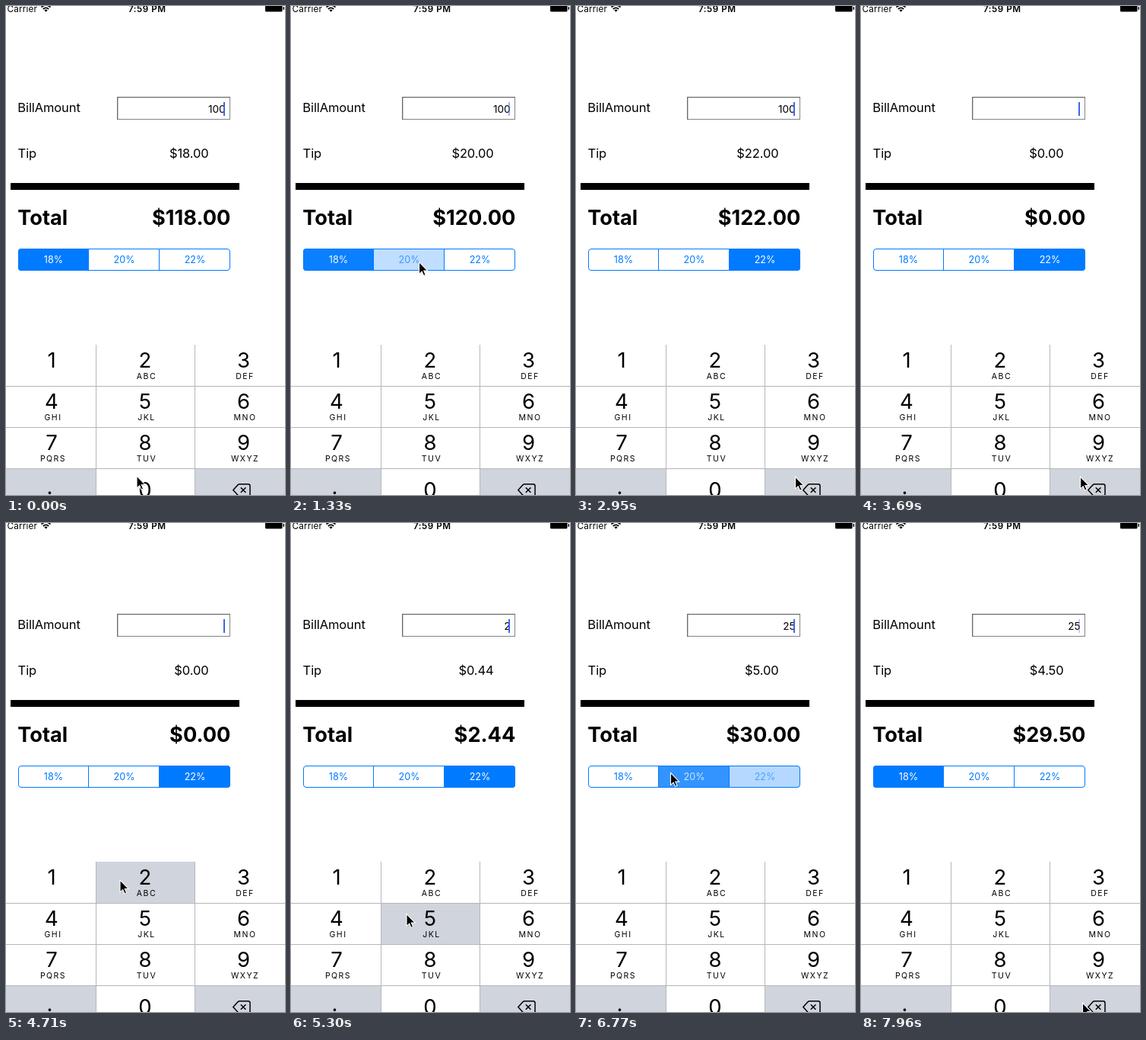
Animation of 367 by 641 pixels, one loop 8000 ms. Source, as an HTML page:

```html
<!DOCTYPE html>
<html lang="en">
<head>
<meta charset="utf-8">
<title>Tip calculator</title>
<style>
  html, body { margin: 0; width: 100%; height: 100%; overflow: hidden; background: #fff; }
  svg { display: block; width: 100%; height: 100%; font-family: Inter, Roboto, "Liberation Sans", sans-serif; }
  .label { font-size: 16.5px; letter-spacing: -0.1px; }
  .total { font-size: 27.2px; font-weight: 700; }
  .field { font-size: 13.6px; }
  .seg { font-size: 12.6px; text-anchor: middle; }
  .digit { font-size: 27.5px; text-anchor: middle; }
  .letters { font-size: 10.5px; letter-spacing: 1.5px; text-anchor: middle; }
  .status { font-size: 11.7px; letter-spacing: 0.2px; }
  .clock { font-weight: 600; letter-spacing: 0.5px; }
  .end { text-anchor: end; }
</style>
</head>
<body>
<svg viewBox="0 0 367 641">
  <defs>
    <clipPath id="round"><rect x="16" y="318" width="279" height="29" rx="4"/></clipPath>
  </defs>

  <text class="status" x="1.5" y="7.6">Carrier</text>
  <g fill="none" stroke="#000" stroke-width="1.7">
    <path d="M46.5 1.6 Q52.5 -3.6 58.5 1.6"/>
    <path d="M48.8 4 Q52.5 0.9 56.2 4"/>
  </g>
  <path d="M50.4 5.4 Q52.5 3.8 54.6 5.4 L52.5 7.7 Z"/>
  <text class="status clock" x="161" y="7.6">7:59 PM</text>
  <rect x="341" y="-2" width="22.5" height="9.5" rx="1.5"/>
  <rect x="364.5" y="1" width="1.5" height="4" rx="0.7"/>

  <text class="label" x="15.3" y="138.6">BillAmount</text>
  <rect x="146.5" y="119.5" width="148" height="29" fill="#fff" stroke="#858585"/>
  <path d="M146 119.75 H295 M146.75 119 V149" stroke="#666" stroke-width="1.2"/>
  <text class="field end" id="amount" x="288.6" y="140.4"></text>
  <rect id="caret" x="286" y="126" width="2" height="18" fill="#3f66ea"/>

  <text class="label" x="15.6" y="198.8">Tip</text>
  <text class="label end" id="tip" x="266.6" y="198.8"></text>
  <rect x="6" y="232" width="301" height="9"/>
  <text class="total" x="15.3" y="286.8">Total</text>
  <text class="total end" id="total" x="295.4" y="287.2"></text>

  <g id="segments" clip-path="url(#round)"></g>
  <g fill="none" stroke="#007aff">
    <rect x="16.5" y="318.5" width="278" height="28" rx="3.5"/>
    <path d="M108.5 318 V347 M201.5 318 V347"/>
  </g>

  <g id="keys"></g>
  <path d="M0 498.5 H367 M0 552.5 H367 M0 606.5 H367 M118.5 444 V641 M248.5 444 V641" stroke="#b5b6ba"/>
  <g fill="none" stroke="#000" stroke-width="1.5" stroke-linejoin="round">
    <path d="M298.8 634.5 L305.2 627.6 Q306 626.8 307.2 626.8 H318.6 Q321 626.8 321 629.2 V639.8 Q321 642.2 318.6 642.2 H307.2 Q306 642.2 305.2 641.4 Z"/>
    <path d="M308.8 631.2 L315.4 637.8 M315.4 631.2 L308.8 637.8"/>
  </g>

  <g id="pointer">
    <path d="M0.8 1.2 V17.2 L4.5 13.8 L6.8 19 L9.4 18 L7.1 12.7 H12 Z" opacity="0.18"/>
    <path d="M0 0 V16 L3.7 12.6 L6 18 L8.6 17 L6.3 11.6 H11.3 Z" stroke="#fff" stroke-width="1.1"/>
  </g>
</svg>

<script>
const LOOP = 8000, STEP = 147.4, LEAD = 12;
const GREY = "#d0d4dc";
const $ = id => document.getElementById(id);
const clamp = v => Math.max(0, Math.min(1, v));

function add(parent, tag, attrs, text = "") {
  const el = document.createElementNS("http://www.w3.org/2000/svg", tag);
  for (const name in attrs) el.setAttribute(name, attrs[name]);
  el.textContent = text;
  return parent.appendChild(el);
}

// [time, typed amount]
const edits = [[-200, "100"], [3240, "10"], [3380, "1"], [3530, ""], [4860, "2"], [5425, "25"]];

// [time, segment]
const picks = [[-1000, 0], [1275, 1], [2002, 2], [6612, 1], [7320, 0]];

// [from, to, key, pressed colour]
const presses = [[3240, 3600, "del", "#fff"], [4700, 4800, "2", GREY], [5150, 5420, "5", GREY]];

// [from, to, control x, control y, end x, end y]
const start = [172, 616];
const moves = [
  [150, 1030, 174, 420, 168.5, 335.5],
  [1480, 1915, 215, 334, 257.5, 329],
  [2365, 2945, 318, 470, 288.5, 617],
  [3690, 4270, 150, 600, 81, 500],
  [4270, 4660, 110, 460, 150, 468],
  [4870, 5150, 153, 490, 152, 512.5],
  [5460, 6200, 150, 400, 90, 372],
  [6200, 6600, 88, 335, 124.5, 327.5],
  [6785, 7070, 90, 340, 51, 332],
  [7375, 7950, 150, 500, 291.5, 629]
];

const rates = [18, 20, 22];
const segments = rates.map((rate, i) => ({
  box: add($("segments"), "rect", { x: [16, 109, 202][i], y: 318, width: 93, height: 29, fill: "#007aff" }),
  label: add($("segments"), "text", { class: "seg", x: 62.5 + 93 * i, y: 337 }, rate + "%")
}));

const keys = {};
const columns = [[0, 118, 60], [118, 130, 183], [248, 119, 312.5]];
const faces = ["1", "2 ABC", "3 DEF", "4 GHI", "5 JKL", "6 MNO", "7 PQRS", "8 TUV", "9 WXYZ", ".", "0", "del"];
faces.forEach((face, i) => {
  const [digit, letters] = face.split(" ");
  const [x, width, mid] = columns[i % 3];
  const row = Math.floor(i / 3), y = 444 + 54 * row;
  const fill = digit === "." || digit === "del" ? GREY : "#fff";
  const box = add($("keys"), "rect", { x, y, width, height: 54, fill });
  keys[digit] = { box, fill };
  if (digit === "del") return;
  const base = digit === "." ? 640 : row === 3 ? 643.5 : y + 30;
  add($("keys"), "text", { class: "digit", x: digit === "." ? 57.5 : mid, y: base }, digit);
  if (letters) add($("keys"), "text", { class: "letters", x: mid + 2, y: y + 45 }, letters);
});

const latest = (table, t) => table.filter(row => row[0] <= t).pop();
const money = v => "$" + v.toFixed(2);

function pointerAt(t) {
  let [x, y] = start;
  for (const [from, to, cx, cy, ex, ey] of moves) {
    if (t <= from) break;
    const p = clamp((t - from) / (to - from));
    const s = (1 - Math.cos(Math.PI * p)) / 2;
    const curve = (a, b, c) => a * (1 - s) ** 2 + 2 * b * s * (1 - s) + c * s * s;
    x = curve(x, cx, ex);
    y = curve(y, cy, ey);
  }
  return [x, y];
}

function caretAt(age) {
  const phase = age % 1000;
  return phase < 850 ? 1 - clamp((phase - 500) / 50) : clamp((phase - 850) / 150);
}

function segmentLevel(i, t) {
  const n = picks.indexOf(latest(picks, t));
  const age = t - picks[n][0];
  if (picks[n][1] === i) return clamp(age / 210);
  if (n > 0 && picks[n - 1][1] === i) return 1 - clamp((age - 45) / 175);
  return 0;
}

function draw(t) {
  const [editTime, typed] = latest(edits, t);
  const bill = Number(typed);
  const tip = bill * rates[latest(picks, t)[1]] / 100;
  $("amount").textContent = typed;
  $("tip").textContent = money(tip);
  $("total").textContent = money(bill + tip);
  $("caret").setAttribute("opacity", caretAt(t - editTime));

  segments.forEach(({ box, label }, i) => {
    const a = segmentLevel(i, t);
    box.setAttribute("opacity", a);
    label.setAttribute("fill", `rgb(${255 * a}, ${122 + 133 * a}, 255)`);
  });

  for (const [from, to, name, colour] of presses) {
    const { box, fill } = keys[name];
    box.setAttribute("fill", t >= from && t < to ? colour : fill);
  }

  $("pointer").setAttribute("transform", `translate(${pointerAt(t)})`);
}

const origin = performance.now();
function tick() {
  const t = (performance.now() - origin) % LOOP;
  draw(Math.floor((t + LEAD) / STEP) * STEP);
  requestAnimationFrame(tick);
}
tick();
</script>
</body>
</html>
```
